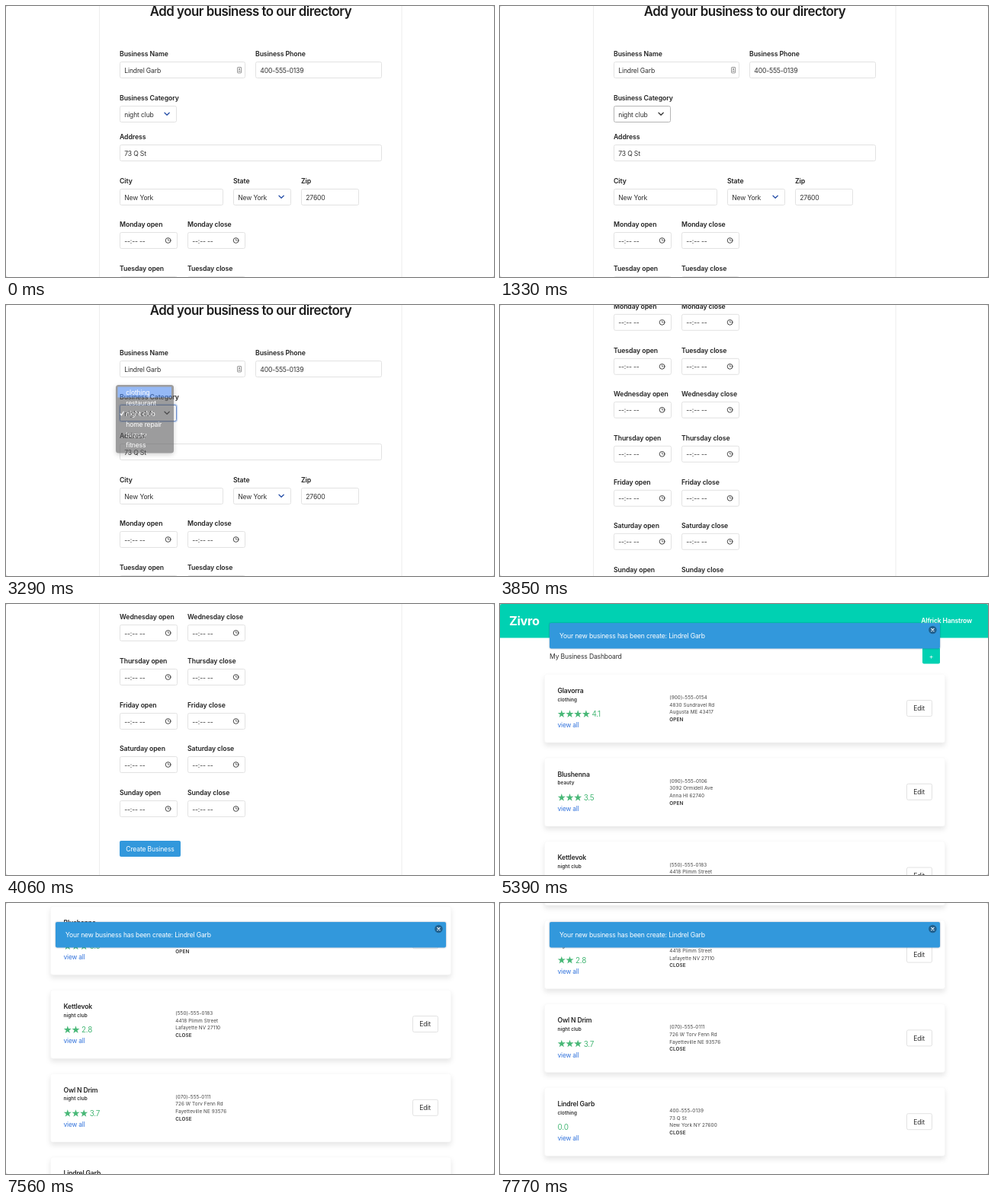
Animation, 640 px wide and 356 px high, one loop 7840 ms. Source, as an HTML page:

```html
<!DOCTYPE html>
<html lang="en">
<head>
<meta charset="utf-8">
<title>Business directory</title>
<style>
  html, body { margin: 0; width: 100%; height: 100%; overflow: hidden; background: #fff; }
  svg { display: block; width: 640px; height: 356px; }
  text { font-family: Inter, "Open Sans", sans-serif; font-size: 8.6px; letter-spacing: -.02em; fill: #303030; white-space: pre; }
  .label { font-size: 8.7px; font-weight: 600; letter-spacing: -.01em; fill: #222; }
  .title { font-size: 16.85px; font-weight: 600; letter-spacing: -.03em; fill: #1c1c1c; }
  .brand { font-size: 16.3px; font-weight: 700; fill: #fff; }
  .name { font-weight: 600; fill: #262626; }
  .small { font-size: 6.35px; letter-spacing: .015em; fill: #444; }
  .strong { font-weight: 600; fill: #303030; }
  .rating { font-size: 9.9px; fill: #48b877; }
  .link { font-size: 8.4px; fill: #3273dc; }
  .white { fill: #fff; }
  .field { fill: #fff; stroke: #e2e2e2; }
  .card { fill: #fff; stroke: #f6f6f6; stroke-width: .6; filter: drop-shadow(0 4px 3px rgba(10, 10, 10, .1)); }
  .line { fill: none; stroke-linecap: round; stroke-linejoin: round; }
  .popup { filter: drop-shadow(0 2px 3px rgba(0, 0, 0, .3)); }
</style>
</head>
<body>
<svg id="stage" viewBox="0 0 640 356"></svg>
<script>
const LOOP = 7840, STEP = 70;
const FORM_SCROLL = 385, LIST_SCROLL = 289;
const SHOP = 'Lindrel Garb', PHONE = '400-555-0139', STREET = '73 Q St';
const DAYS = ['Monday', 'Tuesday', 'Wednesday', 'Thursday', 'Friday', 'Saturday', 'Sunday'];
const OPTIONS = ['clothing', 'restaurant', 'night club', 'home repair', 'beauty', 'fitness'];
const CARDS = [
  ['Glavorra', 'clothing', 4.1, '(900)-555-0154', '4830 Sundravel Rd', 'Augusta ME 43417', 'OPEN'],
  ['Blushenna', 'beauty', 3.5, '(090)-555-0106', '3092 Ormidell Ave', 'Anna HI 62740', 'OPEN'],
  ['Kettlevok', 'night club', 2.8, '(550)-555-0183', '4418 Plimm Street', 'Lafayette NV 27110', 'CLOSE'],
  ['Owl N Drim', 'night club', 3.7, '(070)-555-0111', '726 W Torv Fenn Rd', 'Fayetteville NE 93576', 'CLOSE'],
  [SHOP, 'clothing', 0, PHONE, STREET, 'New York NY 27600', 'CLOSE']
];
// [start time, highlighted option]
const HOVERS = [[0, 2], [2100, 3], [2170, 4], [2450, 3], [2520, 1], [2870, 0], [3080, -1], [3150, 0]];
const BLUE = '#2850a8';

const stage = document.getElementById('stage');

function add(parent, tag, attrs = {}) {
  const el = document.createElementNS('http://www.w3.org/2000/svg', tag);
  for (const key in attrs) el.setAttribute(key, attrs[key]);
  return parent.appendChild(el);
}
const group = (parent, attrs) => add(parent, 'g', attrs);
const rect = (parent, x, y, width, height, attrs) =>
  add(parent, 'rect', { x, y, width, height, rx: 2, ...attrs });
const line = (parent, d, stroke, width = 1) =>
  add(parent, 'path', { d, class: 'line', stroke, 'stroke-width': width });

const SIZES = { label: 8.7, title: 16.85, brand: 16.3, small: 6.35, rating: 9.9, link: 8.4 };
// Places text by the middle of its capitals.
function text(parent, x, middle, str, cls = '', anchor = 'start') {
  const size = SIZES[cls.split(' ')[0]] || 8.6;
  const el = add(parent, 'text', { x, y: middle + size * .365, class: cls, 'text-anchor': anchor });
  el.textContent = str;
  return el;
}

function field(parent, x, top, width, label, value) {
  text(parent, x, top - 9.7, label, 'label');
  const box = rect(parent, x + .5, top + .5, width - 1, 21, { class: 'field' });
  return { box, value: text(parent, x + 6.3, top + 11.4, value) };
}
function select(parent, x, top, width, label, value) {
  const f = field(parent, x, top, width, label, value);
  f.caret = line(parent, `M${x + width - 16} ${top + 9.2}l3.1 3.1l3.1 -3.1`, BLUE, 1.3);
  return f;
}
function timeField(parent, x, top, label) {
  field(parent, x, top, 76, label, '--:-- --');
  const cx = x + 63.6, cy = top + 11;
  add(parent, 'circle', { cx, cy, r: 3.4, class: 'line', stroke: '#333', 'stroke-width': .9 });
  line(parent, `M${cx} ${cy - 1.9}v2h1.4`, '#333', .7);
}

// Form page
const formPage = group(stage);
for (const x of [122, 518.5]) rect(formPage, x, 0, 1, 356, { fill: '#eee', rx: 0 });
const form = group(formPage);
text(form, 321, 6.7, 'Add your business to our directory', 'title', 'middle');
field(form, 149, 73, 165, 'Business Name', SHOP);
rect(form, 303.6, 80.5, 5, 7.4, { fill: 'none', stroke: '#777', 'stroke-width': .8, rx: .6 });
add(form, 'circle', { cx: 306.1, cy: 83, r: .9, fill: '#666' });
line(form, 'M305.1 85.7h2', '#666', .9);
field(form, 327, 73, 166, 'Business Phone', PHONE);
const category = select(form, 149, 131, 75, 'Business Category', 'night club');
const ring = rect(form, 148.4, 130.4, 76.2, 23.2, { fill: 'none', stroke: 'rgba(50,115,220,.25)', 'stroke-width': 1.2, rx: 3 });
field(form, 149, 182, 344, 'Address', STREET);
field(form, 149, 240, 136, 'City', 'New York');
select(form, 298, 240, 76, 'State', 'New York');
field(form, 387, 240, 76, 'Zip', '27600');
DAYS.forEach((day, i) => {
  const top = Math.round(297.2 + i * 57.6);
  timeField(form, 149, top, day + ' open');
  timeField(form, 238, top, day + ' close');
});
const submitRing = rect(form, 148.4, 695.4, 81.2, 22.2, { fill: 'none', stroke: 'rgba(50,152,220,.3)', 'stroke-width': 1.2, rx: 3 });
const submit = rect(form, 149, 696, 80, 21, {});
text(form, 189, 707, 'Create Business', 'white', 'middle');

// Category menu
const popup = group(formPage, { class: 'popup' });
rect(popup, 144, 105, 76, 89.5, { fill: '#5e5e60', 'fill-opacity': .98, rx: 3.5 });
const highlight = rect(popup, 146.5, 0, 70.5, 14, { fill: '#558ff2', rx: 0 });
OPTIONS.forEach((name, i) => text(popup, 157.3, 114.8 + i * 13.9, name, 'white'));
line(popup, 'M150 143l1.5 1.8l2.6 -4.6', '#fff', 1.2);

// Dashboard page
const dashPage = group(stage);
const dash = group(dashPage);
rect(dash, 0, 0, 640, 44.5, { fill: '#00d1b2', rx: 0 });
text(dash, 12, 22, 'Zivro', 'brand');
text(dash, 619, 21.5, 'Alfrick Hanstrow', 'name white', 'end');
text(dash, 65, 69, 'My Business Dashboard');
rect(dash, 554, 57, 23, 21.5, { fill: '#00d1b2' });
text(dash, 565.4, 69, '+', 'white', 'middle');

function star(parent, cx, cy) {
  const points = Array.from({ length: 10 }, (_, k) => {
    const r = k % 2 ? 2.1 : 5.3, a = (k / 5 - .5) * Math.PI;
    return [cx + r * Math.cos(a), cy + r * Math.sin(a)].map(v => v.toFixed(2));
  });
  add(parent, 'polygon', { points: points.join(' '), fill: '#48b877' });
}
CARDS.forEach(([name, kind, rating, phone, street, city, status], i) => {
  const card = group(dash, { transform: `translate(0 ${113.6 + i * 109.8})` });
  const stars = Math.floor(rating);
  rect(card, 58.5, -21.5, 525, 90, { class: 'card', rx: 3 });
  text(card, 75.5, 0, name, 'name');
  text(card, 75.5, 11.6, kind, 'small strong');
  for (let s = 0; s < stars; s++) star(card, 80.8 + s * 10.7, 31);
  text(card, stars ? 77.6 + stars * 10.7 : 75.5, 31, rating.toFixed(1), 'rating');
  text(card, 75.5, 45.6, 'view all', 'link');
  [phone, street, city].forEach((row, k) => text(card, 222.3, 9 + k * 9.6, row, 'small'));
  text(card, 222.3, 37.8, status, 'small strong');
  rect(card, 533.5, 12.9, 33, 21, { class: 'field' });
  text(card, 549.5, 23.6, 'Edit', '', 'middle');
});
rect(dashPage, 65, 25, 512, 33.5, { fill: '#3298dc', style: 'filter:drop-shadow(0 0 1px rgba(0,40,90,.4))' });
text(dashPage, 78, 42, 'Your new business has been create: ' + SHOP, 'white');
add(dashPage, 'circle', { cx: 567.4, cy: 34, r: 5.3, fill: '#22618f' });
line(dashPage, 'M565.8 32.4l3.2 3.2m0 -3.2l-3.2 3.2', '#fff', 1.3);

// Rounded window corners
rect(stage, -.5, -.5, 641, 357, { fill: 'none', stroke: '#ccc', rx: 3 });

const show = (el, on) => el.setAttribute('display', on ? 'inline' : 'none');
const between = (t, a, b) => t >= a && t < b;
function glide(t, from, to, distance) {
  const x = Math.min(1, Math.max(0, (t - from) / (to - from)));
  return distance * x * x * (3 - 2 * x);
}
const scroll = (el, y) => el.setAttribute('transform', `translate(0 ${-y.toFixed(2)})`);

function render(t) {
  const onForm = t < 5390;
  show(formPage, onForm);
  show(dashPage, !onForm);
  scroll(form, glide(t, 3430, 4060, FORM_SCROLL));
  scroll(dash, glide(t, 7210, 7770, LIST_SCROLL));

  const focused = between(t, 1820, 4900), hovered = between(t, 1330, 3500);
  category.box.style.stroke = focused ? '#6a8ccb' : hovered ? '#b5b5b5' : '';
  category.caret.style.stroke = hovered ? '#363636' : BLUE;
  category.value.textContent = t < 3360 ? 'night club' : 'clothing';
  show(ring, focused);

  show(popup, between(t, 1820, 3430));
  popup.setAttribute('opacity', t < 3290 ? 1 : t < 3360 ? .62 : .25);
  const option = HOVERS.filter(h => h[0] <= t).pop()[1];
  show(highlight, option >= 0);
  highlight.setAttribute('y', 107.5 + 13.9 * Math.max(0, option));

  submit.setAttribute('fill', t < 4620 ? '#3298dc' : '#2793da');
  show(submitRing, t >= 4900);
}

function tick() {
  const t = performance.now() % LOOP;
  render(Math.floor(t / STEP) * STEP);
  requestAnimationFrame(tick);
}
tick();
</script>
</body>
</html>
```
